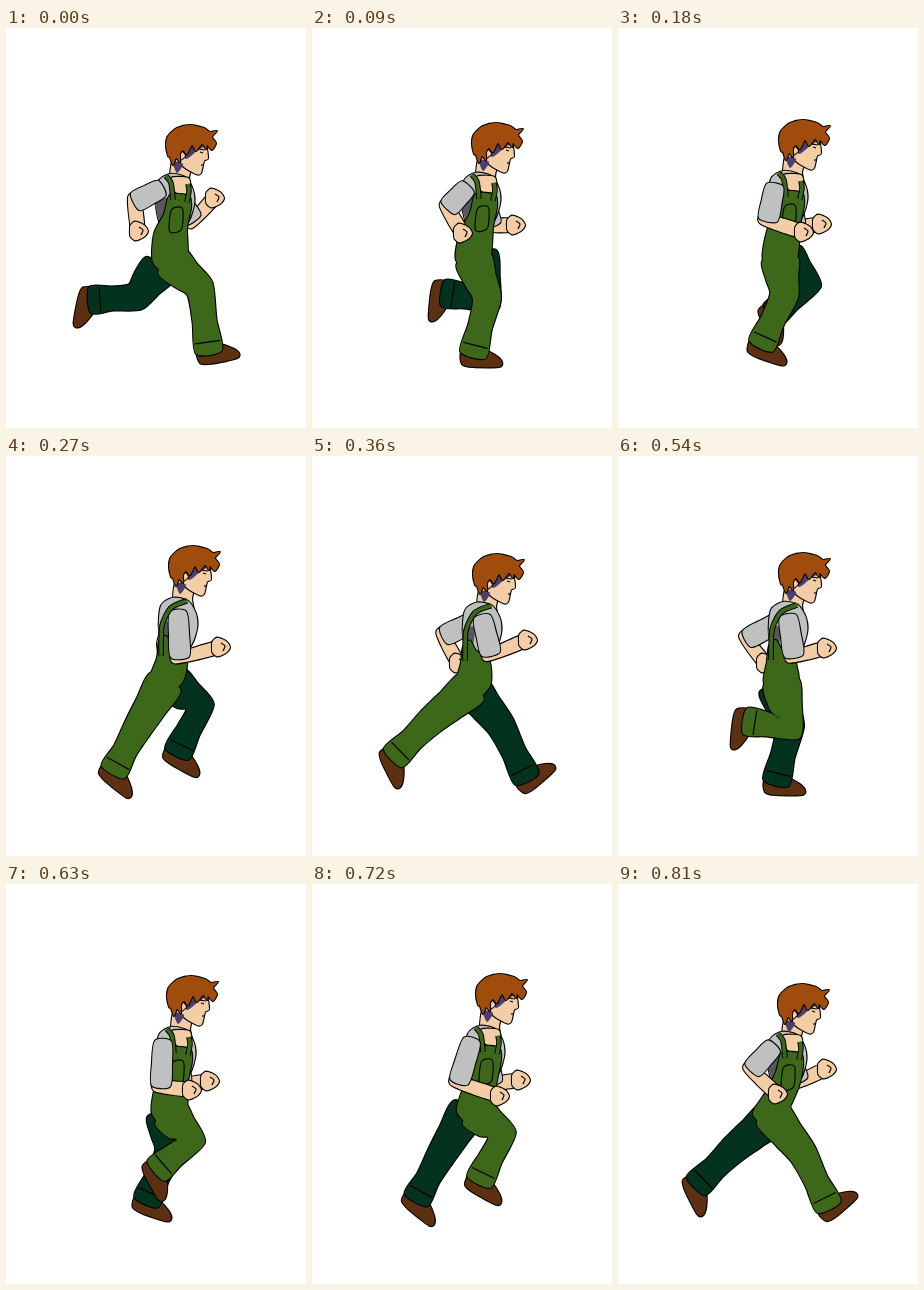
An HTML page with a canvas for the animation above (900 ms loop, 300 by 400 pixels).

```html
<!DOCTYPE html>
<html lang="en">
<head>
<meta charset="utf-8">
<title>Run cycle</title>
<style>
html, body { margin: 0; width: 100%; height: 100%; overflow: hidden; background: #fff; }
canvas { display: block; }
</style>
</head>
<body>
<canvas id="stage" width="300" height="400"></canvas>
<script>
const ctx = document.getElementById('stage').getContext('2d');
const STEP = 90, COUNT = 10;
const GREEN = '#3d6819', DARK = '#03321e', SHIRT = '#bfc1c0', SKIN = '#f3cda6';
const SHOE = '#5d3011', HAIR = '#9f4c0c', SHADE = '#58595b', PURPLE = '#4b3f70';

// One leg cycle: hip, knee, ankle, shoe angle. The far leg runs half a cycle later.
const legs = [
  [164, 232, 194, 261, 203, 324, -12],
  [161, 230, 175, 271, 161, 327, 0],
  [162, 230, 166, 268, 143, 318, 18],
  [160, 225, 131, 273, 107, 316, 38],
  [161, 230, 119, 265, 81, 302, 62],
  [154, 240, 129, 269, 84, 272, 100],
  [163, 225, 172, 272, 127, 265, 95],
  [163, 228, 185, 257, 150, 287, 60],
  [162, 226, 190, 251, 167, 298, 28],
  [152, 228, 185, 270, 211, 323, -42]
];
// Elbow and fist.
const nearArms = [
  [129, 174, 132, 203], [136, 180, 150, 205], [150, 192, 185, 204], [174, 201, 214, 191],
  [179, 198, 215, 184], [178, 198, 213, 188], [176, 200, 208, 192], [155, 202, 185, 206],
  [147, 198, 187, 212], [134, 186, 159, 210]
];
const farArms = [
  [187, 192, 208, 170], [180, 197, 203, 197], [178, 199, 203, 196], [160, 193, 172, 200],
  [132, 180, 146, 207], [130, 181, 146, 207], [129, 183, 147, 207], [176, 200, 203, 197],
  [181, 199, 208, 196], [181, 197, 208, 185]
];
const heads = [[0, 0], [0, -2], [1, -5], [3, -7], [1, 1], [1, 0], [1, 0], [1, -5], [4, -7], [0, 3]];

const points = text => text.split(' ').map(p => p.split(',').map(Number));
const neck = points('167,132 184,138 183,150 184,165 165,160');
const face = points('173,122 178,114 198,114 202,130 198,133 195,145 190,146 176,137');
const nape = points('167,134 177,136 171,145');
const fringe = points('178,119 199,117 191,123 180,131');
const ear = points('173,126 176,124 179,128 174,132');
const hair = points('162,128 160,117 162,108 171,100 184,97 198,100 204,104 211,103 206,109 210,115 206,122 201,117 200,121 196,116 190,123 186,117 181,126 177,122 174,126 174,134 170,130 167,137 164,129');
const faceLines = ['192,121 199,122', '194,124 197,125', '195,137 198,137'].map(points);
const shirt = points('152,154 164,146 179,149 187,162 188,177 180,196 157,200 150,178');
const chest = points('165,150 182,150 184,160 177,168 168,162');
const armpit = points('149,175 161,170 161,184 156,198');
const pocket = points('166,182 176,181 175,201 164,203');
const bibTop = points('148,206 158,186 164,167 183,168 185,180 181,200');
const backTop = points('148,206 150,190 157,184 163,194 175,202 178,212');
const frontStraps = ['160,148 165,155 167,172', '182,156 183,163 181,174'].map(points);
const backStrap = points('152,204 153,174 162,156 178,149');
const shoe = points('-11,-3 -11,9 0,12 26,12 29,7 22,0 9,-6');

// Smooth curve through all points, tighter than Catmull-Rom.
function trace(pts, closed = true) {
  const n = pts.length, k = 0.13;
  const at = i => closed ? pts[(i + n) % n] : pts[Math.max(0, Math.min(n - 1, i))];
  ctx.beginPath();
  ctx.moveTo(...pts[0]);
  for (let i = 0; i < (closed ? n : n - 1); i++) {
    const [a, b, c, d] = [at(i - 1), at(i), at(i + 1), at(i + 2)];
    ctx.bezierCurveTo(b[0] + (c[0] - a[0]) * k, b[1] + (c[1] - a[1]) * k,
      c[0] - (d[0] - b[0]) * k, c[1] - (d[1] - b[1]) * k, ...c);
  }
  if (closed) ctx.closePath();
}

function line(pts, color = '#000', width = 1.2) {
  trace(pts, false);
  ctx.strokeStyle = color;
  ctx.lineWidth = width;
  ctx.stroke();
}

// Fills shapes as one area with a single outer outline.
function shape(color, ...parts) {
  ctx.strokeStyle = '#000';
  ctx.lineWidth = 2.2;
  for (const part of parts) { trace(part); ctx.stroke(); }
  flat(color, ...parts);
}

function flat(color, ...parts) {
  ctx.fillStyle = color;
  for (const part of parts) { trace(part); ctx.fill(); }
}

function band(pts) {
  line(pts, '#000', 5.6);
  line(pts, GREEN, 3.6);
}

const mix = (a, b, t) => [a[0] + (b[0] - a[0]) * t, a[1] + (b[1] - a[1]) * t];

// Outline of a limb along its joints, with a half width at each joint.
function limb(joints, widths) {
  const left = [], right = [];
  joints.forEach(([x, y], i) => {
    const unit = (a, b) => {
      const size = Math.hypot(b[0] - a[0], b[1] - a[1]) || 1;
      return [(b[0] - a[0]) / size, (b[1] - a[1]) / size];
    };
    const into = unit(joints[Math.max(i - 1, 0)], joints[i]);
    const out = unit(joints[i], joints[Math.min(i + 1, joints.length - 1)]);
    const turn = Math.atan2(into[1] + out[1], into[0] + out[0]);
    const nx = -Math.sin(turn) * widths[i], ny = Math.cos(turn) * widths[i];
    left.push([x + nx, y + ny]);
    right.unshift([x - nx, y - ny]);
  });
  return left.concat(right);
}

function leg(pose, color, dx = 0, torso) {
  const [hx, hy, kx, ky, ax, ay, angle] = pose;
  const hip = [hx + dx, hy], knee = [kx + dx, ky], ankle = [ax + dx, ay];
  const turn = angle * Math.PI / 180, c = Math.cos(turn), s = Math.sin(turn);
  shape(SHOE, shoe.map(([x, y]) => [ankle[0] + x * c - y * s, ankle[1] + x * s + y * c]));
  const outline = limb([hip, mix(hip, knee, 0.55), knee, mix(knee, ankle, 0.5), ankle], [17, 16, 14, 12, 13]);
  const parts = [outline];
  if (torso) parts.push([...torso, [hip[0] + 17, hip[1]], [hip[0], hip[1] + 16], [hip[0] - 17, hip[1] + 2]]);
  shape(color, ...parts);
  const size = Math.hypot(ankle[0] - knee[0], ankle[1] - knee[1]);
  const cuff = limb([mix(knee, ankle, 1 - 10 / size), ankle], [12.5, 13]);
  line([cuff[0], cuff[3]]);
}

function arm([ex, ey, fx, fy], shoulder) {
  const elbow = [ex, ey], fist = [fx, fy];
  shape(SKIN, limb([mix(shoulder, elbow, 0.85), elbow, fist], [8, 8, 6]));
  shape(SKIN, Array.from({ length: 10 }, (_, i) => {
    const a = i * Math.PI / 5, r = 9 + Math.cos(3 * a);
    return [fx + r * Math.cos(a), fy + r * Math.sin(a)];
  }));
  line([[fx + 1, fy - 4], [fx + 5, fy - 1], [fx + 3, fy + 4]]);
  shape(SHIRT, limb([shoulder, mix(shoulder, elbow, 0.5), elbow], [8, 10, 9]));
}

function render(now) {
  const i = Math.floor(now / STEP) % COUNT;
  const [hx, hy] = heads[i];
  const move = (pts, ky = 1) => pts.map(([x, y]) => [x + hx, y + hy * ky]);
  const body = pts => move(pts, 0.6);
  const seenFromBack = i >= 3 && i <= 6;

  ctx.fillStyle = '#fff';
  ctx.fillRect(0, 0, 300, 400);
  ctx.lineJoin = 'round';

  shape(SKIN, move(neck));
  arm(farArms[i], [167 + hx, 162 + hy * 0.6]);
  leg(legs[(i + 5) % COUNT], DARK, i === 0 ? 0 : i < 5 ? 4 : -3);
  shape(SHIRT, body(shirt));
  if (!seenFromBack) shape(SKIN, body(chest));
  flat(SHADE, body(armpit));

  leg(legs[i], GREEN, 0, body(seenFromBack ? backTop : bibTop));
  if (seenFromBack) {
    arm(nearArms[i], [169 + hx, 160 + hy * 0.6]);
    band(body(backStrap));
  } else {
    frontStraps.forEach(strap => band(body(strap)));
    shape(GREEN, body(pocket));
    arm(nearArms[i], [156 + hx, 160 + hy * 0.6]);
  }

  shape(SKIN, move(face));
  flat(PURPLE, move(nape), move(fringe));
  shape(SKIN, move(ear));
  shape(HAIR, move(hair));
  faceLines.forEach(l => line(move(l)));
}

function tick() {
  render(performance.now());
  requestAnimationFrame(tick);
}
tick();
</script>
</body>
</html>
```
